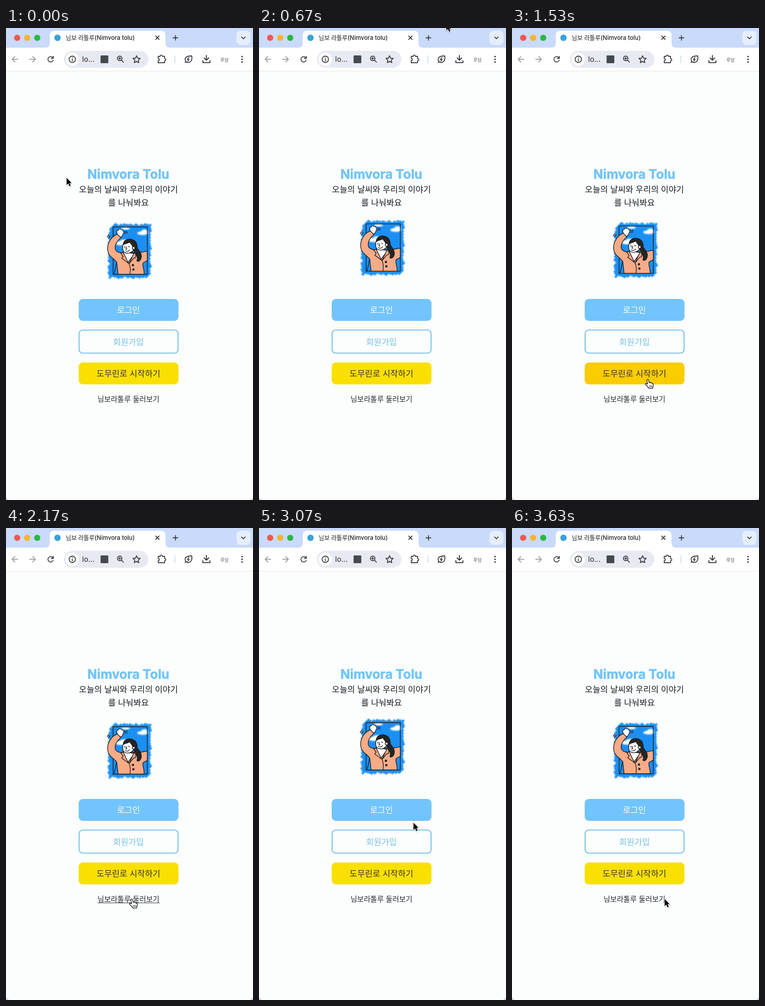
These frames come from a looping animation (542 by 1033 pixels, 3660 ms). An HTML page:

```html
<!DOCTYPE html>
<html lang="ko">
<head>
<meta charset="utf-8">
<title>님보 라톨루</title>
<style>
  html, body { margin: 0; width: 100%; height: 100%; overflow: hidden; background: #d3d6d6; }
  svg { display: block; width: 100vw; height: 100vh; }
  text { font-family: Inter, "Noto Sans CJK KR", "Noto Sans CJK", sans-serif; }
  .ko { font: 18.3px "Noto Sans CJK KR", "Noto Sans CJK", sans-serif; text-anchor: middle; fill: #15181e; }
  .icon { fill: none; stroke: #34373b; stroke-width: 1.8; stroke-linejoin: round; stroke-linecap: round; }
  .ink { fill: none; stroke: #171717; stroke-width: 1.4; stroke-linejoin: round; stroke-linecap: round; }
  #login rect { fill: #72c4fc; }
  #login.hover rect { fill: #5bb5f5; }
  #login text { fill: #fff; }
  #join rect { fill: #fcfdfd; stroke: #74c1e8; stroke-width: 2.2; }
  #join.hover rect { fill: #eff8ff; }
  #join text { fill: #74c1e8; }
  #social rect { fill: #f9e000; }
  #social.hover rect { fill: #f9cd00; }
  #social text { fill: #3b3027; }
  #browse text { font-size: 15.9px; fill: #262a31; }
  #browse path { stroke: #262a31; visibility: hidden; }
  #browse.hover path { visibility: visible; }
</style>
</head>
<body>
<svg viewBox="0 0 542 1033" preserveAspectRatio="none">
  <defs>
    <clipPath id="window"><rect width="542" height="1033" rx="9"/></clipPath>
    <filter id="soft" x="-20%" y="-20%" width="140%" height="140%"><feGaussianBlur stdDeviation="1"/></filter>
    <filter id="cloud" x="-30%" y="-60%" width="160%" height="220%"><feGaussianBlur stdDeviation="1.6"/></filter>
    <filter id="shade" x="-50%" y="-50%" width="200%" height="200%">
      <feDropShadow dx="0" dy="1.2" stdDeviation="1" flood-opacity=".3"/>
    </filter>
  </defs>

  <g clip-path="url(#window)">
    <rect width="542" height="1033" fill="#fcfdfd"/>

    <!-- tab strip -->
    <rect width="542" height="43" fill="#c9dafa"/>
    <circle cx="24.5" cy="21.5" r="6.8" fill="#f5564c"/>
    <circle cx="46.5" cy="21.5" r="6.8" fill="#f8b42c"/>
    <circle cx="68.5" cy="21.5" r="6.8" fill="#2ab940"/>
    <path d="M86 43Q96 43 96 33V16Q96 6 106 6H340Q350 6 350 16V33Q350 43 360 43Z" fill="#fff"/>
    <circle cx="113" cy="21.5" r="7" fill="#37a3dc"/>
    <text x="131" y="26" font-size="13" font-weight="500" fill="#202226">님보 라톨루(Nimvora tolu)</text>
    <path class="icon" d="M328.5 17.5l7.5 7.5m0-7.5l-7.5 7.5M366.5 21.5h10.5m-5.2-5.2v10.4"/>
    <rect x="505.500" y="6" width="31" height="31" rx="9" fill="#e5eefc"/>
    <path class="icon" d="M517 19.700l4 4 4-4" stroke-width="2"/>

    <!-- toolbar -->
    <rect y="43" width="542" height="51" fill="#fff"/>
    <path d="M0 94.500H542" stroke="#e6e5dc"/>
    <path class="icon" d="M26 68.500H13.500m6-6l-6 6 6 6M52 68.500H64.500m-6-6l6 6-6 6" style="stroke:#9b9ea3"/>
    <path class="icon" d="M103 65.500A5.900 5.900 0 1 0 103.500 70.500M103.800 62v4.500h-4.500" stroke-width="2"/>
    <rect x="127" y="50" width="185.500" height="37" rx="18.500" fill="#e7eaf2"/>
    <circle cx="145.500" cy="68.500" r="14.500" fill="#fff"/>
    <g class="icon">
      <circle cx="145.500" cy="68.500" r="7"/>
      <path d="M145.500 68v4M145.500 65v.1"/>
      <circle cx="249.500" cy="66.500" r="5"/>
      <path d="M253.300 70.300l4.500 4.700M247.300 66.500h4.400m-2.200-2.200v4.400"/>
      <path d="M286.500 60.700l2.300 5.300 5.700.500-4.300 3.800 1.300 5.600-5-3-5 3 1.300-5.600-4.300-3.800 5.700-.500z"/>
      <path d="M334 62h4.500c-.500-3.500 5-3.500 4.500 0h5v5.200c3.500-.300 3.500 4.800 0 4.500v4.300h-14v-4.500c3.200 0 3.200-4.700 0-4.700z"/>
      <path d="M407.500 61c1.500 7-.5 14-7.500 14.500-4 0-7-3-7-7 .3-5.500 6-7.500 14.500-7.500zM393 75.500l2-2M401.500 64.500l-3.500 4.300h4l-3 3.700"/>
      <path d="M439.800 60v10.500m-5-5l5 5 5-5M432 71.500v4.300h15.500v-4.300" stroke-width="2.100"/>
    </g>
    <text x="167" y="74" font-size="16" fill="#25282c">lo...</text>
    <rect x="207.500" y="60" width="17" height="17" rx="1.500" fill="#45494e"/>
    <path d="M370.500 60v17" stroke="#cbdcea" stroke-width="1.800"/>
    <text x="479.500" y="73.500" class="ko" style="font-size:10px;font-weight:300;fill:#55585c">루담</text>
    <g fill="#34373b"><circle cx="518" cy="62.500" r="1.700"/><circle cx="518" cy="68.500" r="1.700"/><circle cx="518" cy="74.500" r="1.700"/></g>

    <!-- page -->
    <text x="268.500" y="330" text-anchor="middle" font-size="28" font-weight="700" fill="#72c4f8"
      stroke="#72c4f8" stroke-width=".6" stroke-linejoin="round">Nimvora Tolu</text>
    <text class="ko" x="268.700" y="360">오늘의 날씨와 우리의 이야기</text>
    <text class="ko" x="268.700" y="389">를 나눠봐요</text>

    <g id="art">
      <g filter="url(#soft)">
        <rect x="233" y="434" width="79" height="107" fill="#4facf7"/>
        <path id="hatch" fill="none" stroke="#1d8ff3" stroke-width="5" stroke-linecap="round"/>
      </g>
      <g fill="#fff" filter="url(#cloud)">
        <ellipse cx="252" cy="471" rx="12" ry="4.500"/>
        <ellipse cx="259" cy="467" rx="9" ry="4"/>
        <ellipse cx="300" cy="449" rx="12" ry="4"/>
        <ellipse cx="304" cy="445" rx="7" ry="4"/>
        <ellipse cx="262" cy="439" rx="10" ry="2.500"/>
      </g>
      <rect class="ink" x="235" y="435.500" width="75" height="103.500"/>
      <path class="ink" style="fill:#f7ab87" d="M245 451C232 455 222 470 223 485C224 500 236 503 243 513L246 539H303C304 527 298 520 301 514L310 509V489C303 488 297 493 290 491L254 492C246 492 240 488 239.500 482C239 473 245 465 252 459Z"/>
      <path class="ink" d="M243 513C240 522 240 532 236 539"/>
      <path class="ink" style="fill:#fff" d="M257 490L267 514L282 494Z"/>
      <path class="ink" style="fill:#f7ab87" d="M257 491L252 493L257 500L254 504L269 515ZM281 492L285 496L284 503L280 504L270 516Z"/>
      <path class="ink" d="M270 516C273 522 273 532 272 539"/>
      <circle cx="278.500" cy="519" r="2.500" fill="#222"/>
      <circle cx="279.500" cy="528.500" r="2.500" fill="#222"/>
      <path class="ink" style="fill:#fff" d="M258 470C255 480 255 490 262 492C270 495 279 490 281 483L280 468C274 461 262 463 258 470Z"/>
      <path class="ink" style="fill:#252525" d="M258 474C257 464 268 460 277 463C286 466 288 474 288 481C290 487 298 491 297 501C296 510 289 513 287 509C291 503 285 498 284 491L281 488C281 480 276 475 271 468C268 472 262 471 258 474Z"/>
      <circle class="ink" style="fill:#fff" cx="280" cy="481.500" r="3"/>
      <circle cx="261" cy="479.500" r="1.200"/>
      <circle cx="270" cy="478.500" r="1.200"/>
      <path class="ink" d="M265 479l-2 5h2.500M262 487.500Q268 491 271 485.500"/>
      <path class="ink" style="fill:#fff" d="M245 452C241 446 244 442 247 442C248 439 251 439 252 441C255 440 257 442 256.500 444C260 446 258 450 256.500 451C256 455 254 457 251 458Z"/>
      <path class="ink" d="M260.500 444q2 3 .5 6.500M264.500 444q1.500 3 .5 5.500M222 457l4.500-6M224.500 460l4-5.500" stroke-width="1.200"/>
    </g>

    <g id="login"><rect x="159.500" y="593" width="219" height="48" rx="9"/><text class="ko" x="268.700" y="624">로그인</text></g>
    <g id="join"><rect x="160.400" y="661" width="217.200" height="50.500" rx="8"/><text class="ko" x="268.700" y="694">회원가입</text></g>
    <g id="social"><rect x="159.500" y="732" width="219" height="48" rx="9"/><text class="ko" x="268.700" y="763">도무린로 시작하기</text></g>
    <g id="browse"><text class="ko" x="268.700" y="818">님보라톨루 둘러보기</text><path d="M201 820.500H337"/></g>
  </g>

  <g id="cursor" filter="url(#shade)" stroke-linejoin="round">
    <path id="arrow" d="M0 0V15.500L3.600 12.300L6.200 18.300L9 17.100L6.400 11.200H11Z" fill="#000" stroke="#fff" stroke-width="1.800" paint-order="stroke"/>
    <g id="hand" stroke="#000" stroke-width="1.200" stroke-linecap="round">
      <path fill="#fff" d="M-2 0C-2 -2.500 1.300 -2.500 1.800 0L3 5.500C4 4 6 4.500 6.300 6C7.200 5 9 5.500 9.400 7C10.800 6.500 12 8 12 10C12 13 10.800 14 10.500 17.500H2.500C2 15 -3 12 -4.800 8.700C-5.500 6.500 -3 6 -.500 8.500Z"/>
      <path d="M4 11.500v3.500M6.300 11.500v3.500M8.600 11.500v3.500" stroke-width=".9"/>
    </g>
  </g>
</svg>
<script>
const LOOP = 3660, BOB = 2000, BOB_START = 50, LIFT = 9.6;
const $ = id => document.getElementById(id);

// time, x, y of the pointer's hot spot
const route = [
  [0, 133, 328], [570, 411, -18], [670, 411, -10], [760, 405, 20], [1000, 330, 560],
  [1150, 315, 625], [1300, 306, 690], [1450, 298, 771], [1700, 298, 771],
  [1950, 276, 814], [2700, 276, 814], [3060, 339, 645], [3200, 339, 645], [3600, 335, 812]
];

// left, top, right, bottom
const zones = {
  login: [159, 593, 378, 641],
  join: [159, 660, 378, 712],
  social: [159, 732, 378, 780],
  browse: [201, 800, 334, 823]
};

function bezier(x1, y1, x2, y2) {
  const at = (a, b, s) => 3 * a * s * (1 - s) ** 2 + 3 * b * s * s * (1 - s) + s ** 3;
  return x => {
    let lo = 0, hi = 1;
    for (let i = 0; i < 24; i++) {
      const mid = (lo + hi) / 2;
      if (at(x1, x2, mid) < x) lo = mid; else hi = mid;
    }
    return at(y1, y2, lo);
  };
}
const rise = bezier(.42, .08, .58, 1);
const fall = bezier(.25, .1, .25, 1);
const glide = bezier(.4, 0, .6, 1);

function bobOffset(t) {
  const p = ((t - BOB_START + BOB) % BOB) / (BOB / 2);
  return -LIFT * (p < 1 ? rise(p) : 1 - fall(p - 1));
}

function pointerAt(t) {
  const i = route.findIndex(k => k[0] > t);
  if (i < 0) return route[route.length - 1].slice(1);
  const [t0, x0, y0] = route[i - 1], [t1, x1, y1] = route[i];
  const p = glide((t - t0) / (t1 - t0));
  return [x0 + (x1 - x0) * p, y0 + (y1 - y0) * p];
}

function drawHatch() {
  const L = 229, R = 314, T = 433, B = 543;
  let seed = 7, d = "";
  const rand = () => (seed = seed * 16807 % 2147483647) / 2147483647;
  for (let c = L + T + 8; c < R + B - 4; c += 6.5) {
    const x1 = Math.max(L, c - B) - rand() * 4;
    const x2 = Math.min(R, c - T) + rand() * 4;
    d += `M${x1} ${c - x1}L${x2} ${c - x2}`;
  }
  $("hatch").setAttribute("d", d);
}

function render(t) {
  $("art").setAttribute("transform", `translate(0 ${bobOffset(t)})`);
  const [x, y] = pointerAt(t);
  let over = false;
  for (const id in zones) {
    const [l, top, r, b] = zones[id];
    const inside = x >= l && x <= r && y >= top && y <= b;
    $(id).classList.toggle("hover", inside);
    over = over || inside;
  }
  $("cursor").setAttribute("transform", `translate(${x} ${y})`);
  $("arrow").style.display = over ? "none" : "";
  $("hand").style.display = over ? "" : "none";
}

drawHatch();
const start = performance.now();
function tick() {
  render((performance.now() - start) % LOOP);
  requestAnimationFrame(tick);
}
render(0);
requestAnimationFrame(tick);
</script>
</body>
</html>
```
